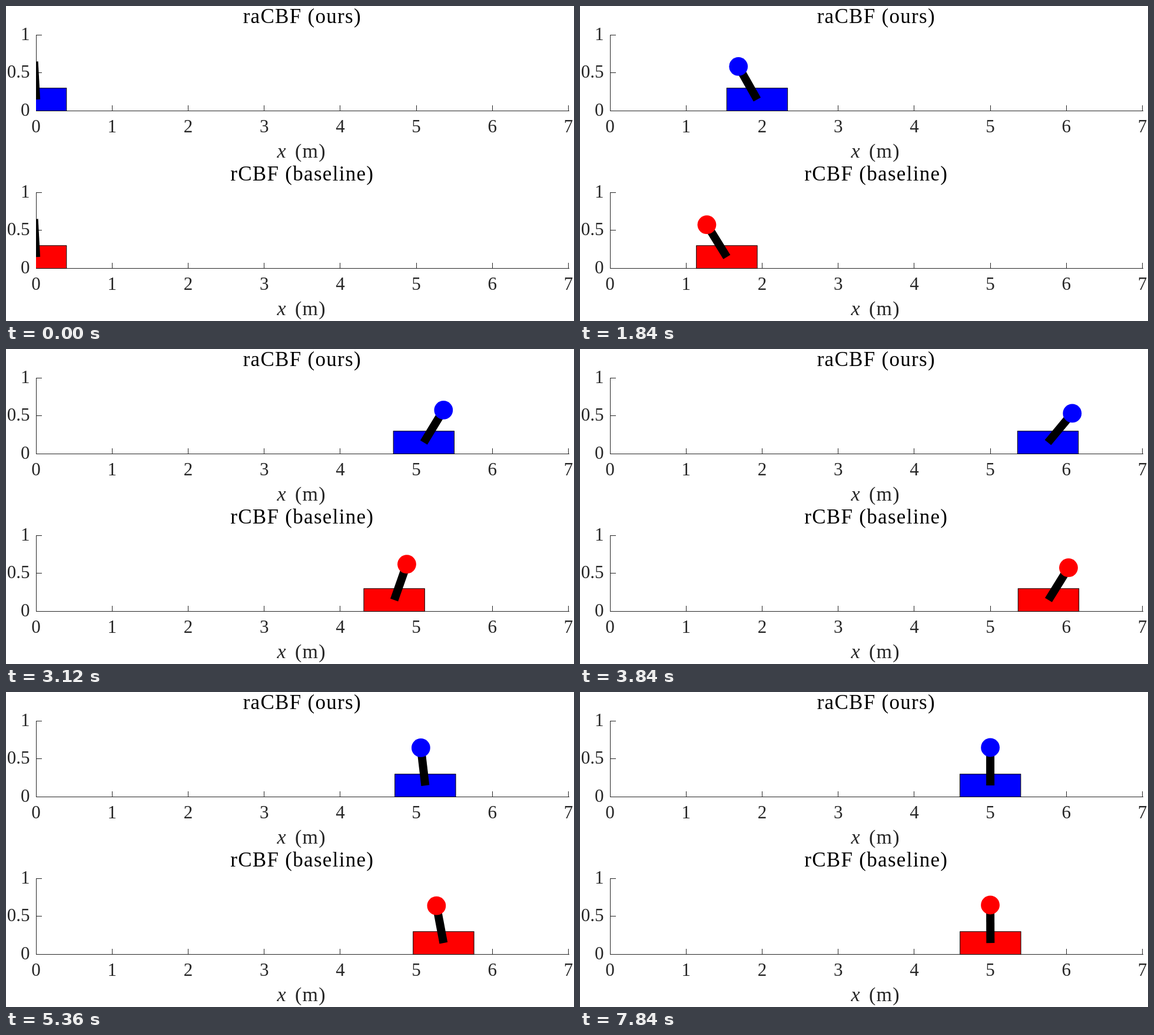
An HTML page for the animation above (7920 ms loop, 965x536 px).

```html
<!DOCTYPE html>
<html lang="en">
<head>
<meta charset="utf-8">
<title>Cart and pole comparison</title>
<style>
  html, body { margin: 0; width: 100%; height: 100%; overflow: hidden; background: #fff; }
  svg { display: block; width: 965px; height: 536px; }
  text { font-family: "Liberation Serif", "Times New Roman", serif; font-size: 31px; fill: #262626; }
  .title { font-size: 35px; letter-spacing: 1.3px; fill: #000; }
  .label { font-size: 34px; letter-spacing: 1.3px; }
  .axes { stroke: #262626; fill: none; shape-rendering: crispEdges; }
  .cart { stroke: #000; }
  .pole { stroke: #000; stroke-width: 14; }
</style>
</head>
<body>
<svg id="stage" viewBox="0 0 965 536">
  <clipPath id="plot"><rect x="51" y="40" width="906" height="139"/></clipPath>
</svg>
<script>
const LOOP = 7920, STEP = 80;
const LEFT = 51.1, UNIT = 129.2, FLOOR = 178.5;
const CART_W = 0.8 * UNIT, CART_H = 0.3 * UNIT;
const POLE = 0.5 * UNIT, PIVOT_Y = FLOOR - 0.15 * UNIT;
const GOAL = 5;

// Points are [seconds, metres] for the cart and [seconds, degrees] for the pole.
// The rates say how fast each one settles after its last point.
const RUNS = [
  {
    top: 0, title: "raCBF (ours)", color: "#00f",
    cart: {
      points: launch(1.84, 1.934).concat([[2.4, 3.522], [3.2, 5.219], [4, 5.78], [4.8, 5.319], [5.36, 5.118]]),
      rest: GOAL, rate: 2.6
    },
    pole: {
      points: [[0, -3.1], [0.8, -26.4], [1.6, -33.7], [1.84, -29.5], [2.08, 1], [2.56, 21.5],
        [3.2, 32.3], [3.84, 39.7], [4.45, 0], [4.85, -12.7], [5.36, -6.7]],
      rest: 0, rate: 2.05
    }
  },
  {
    top: 268, title: "rCBF (baseline)", color: "#f00",
    cart: {
      points: launch(1.84, 1.535).concat([[2.24, 2.55], [2.56, 3.415], [3.2, 4.862], [3.84, 5.765],
        [4.3, 5.981], [4.8, 5.768], [5.36, 5.358]]),
      rest: GOAL, rate: 1.95
    },
    pole: {
      points: [[0, -3.1], [0.8, -22.2], [1.2, -25.4], [1.84, -31.7], [2.4, 7.5], [3.2, 20.3],
        [4.3, 36], [4.8, 3], [5.15, -11.5], [5.36, -10.7]],
      rest: 0, rate: 1.35
    }
  }
];

// Start from rest along a power curve that reaches x at time end
function launch(end, x) {
  return [0, 0.4, 0.8, 1.2, 1.6, end].map(t => [t, x * (t / end) ** 2.61]);
}

// Slope of the parabola through three neighbours, flat at turning points
function slope(points, i) {
  const [t, y] = points[i];
  const before = points[i - 1], after = points[i + 1];
  const s0 = before && (y - before[1]) / (t - before[0]);
  const s1 = after && (after[1] - y) / (after[0] - t);
  if (!before) return s1;
  if (!after) return s0;
  if (s0 * s1 <= 0) return 0;
  return (s0 * (after[0] - t) + s1 * (t - before[0])) / (after[0] - before[0]);
}

function sample({ points, rest, rate }, t) {
  const next = points.findIndex(p => p[0] > t);
  if (next < 0) {
    const [end, y] = points[points.length - 1];
    return rest + (y - rest) * Math.exp(-rate * (t - end) ** 1.1);
  }
  const [t0, y0] = points[next - 1], [t1, y1] = points[next];
  const h = t1 - t0, u = (t - t0) / h, v = 1 - u;
  return v * v * (1 + 2 * u) * y0 + u * u * (3 - 2 * u) * y1
    + h * u * v * (v * slope(points, next - 1) - u * slope(points, next));
}

function set(el, attrs) {
  for (const key in attrs) el.setAttribute(key, attrs[key]);
}

function add(parent, name, attrs, text = "") {
  const el = document.createElementNS("http://www.w3.org/2000/svg", name);
  set(el, attrs);
  el.textContent = text;
  parent.appendChild(el);
  return el;
}

function makePlot(run) {
  const plot = add(document.getElementById("stage"), "g", { transform: `translate(0 ${run.top})` });
  const write = (x, y, text, anchor, cls = "") =>
    add(plot, "text", { x, y, "text-anchor": anchor, class: cls }, text);

  write(503.3, 28.5, run.title, "middle", "title");
  write(460.5, 258, "x", "start", "label").setAttribute("font-style", "italic");
  write(491, 258, "(m)", "start", "label");

  let path = "M51.5 49V178.5H956.5M51.5 49.5H61M51.5 113.5H61";
  for (let i = 0; i <= 7; i++) {
    const x = LEFT + i * UNIT;
    path += `M${Math.floor(x) + 0.5} 178.5V169`;
    write(x, 215, i, "middle");
  }
  add(plot, "path", { d: path, class: "axes" });
  ["0", "0.5", "1"].forEach((text, i) => write(40.5, 187 - i * 64.6, text, "end"));

  const clipped = add(plot, "g", { "clip-path": "url(#plot)" });
  const cart = add(clipped, "rect", {
    y: FLOOR - CART_H, width: CART_W, height: CART_H, fill: run.color, class: "cart"
  });
  const pole = add(clipped, "line", { class: "pole", y1: PIVOT_Y });
  const ball = add(plot, "circle", { r: 15.9, fill: run.color });

  return t => {
    const x = LEFT + UNIT * sample(run.cart, t);
    const angle = sample(run.pole, t) * Math.PI / 180;
    const tipX = x + POLE * Math.sin(angle), tipY = PIVOT_Y - POLE * Math.cos(angle);
    set(cart, { x: x - CART_W / 2 });
    set(pole, { x1: x, x2: tipX, y2: tipY });
    // The ball shows only while its centre lies inside the axes
    set(ball, { cx: tipX, cy: tipY, visibility: tipX < LEFT ? "hidden" : "visible" });
  };
}

const poses = RUNS.map(makePlot);
const start = performance.now();

function draw() {
  const t = Math.floor((performance.now() - start) % LOOP / STEP) * STEP / 1000;
  poses.forEach(pose => pose(t));
  requestAnimationFrame(draw);
}
draw();
</script>
</body>
</html>
```
